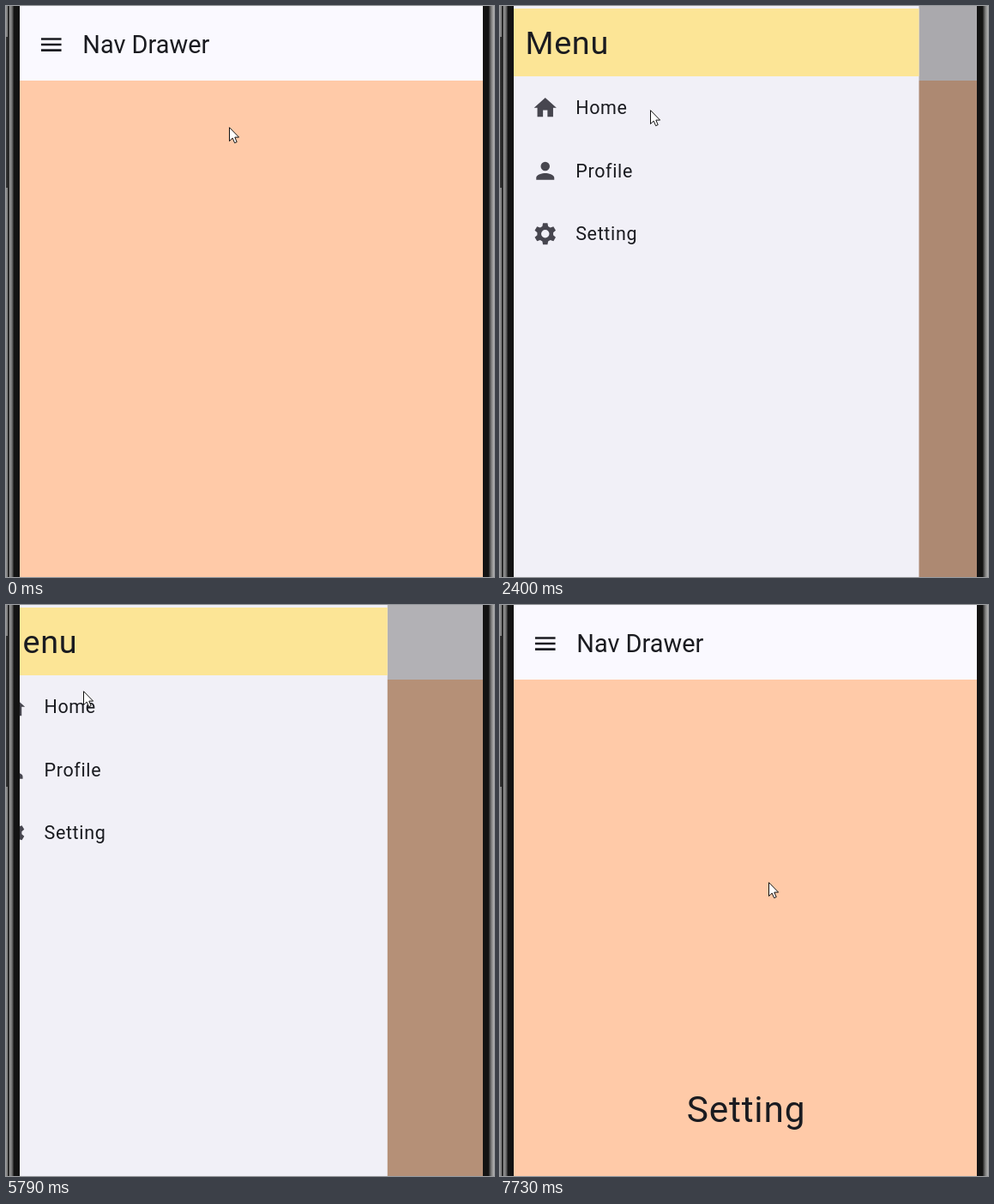
These frames come from a looping animation (569x666 px, 7990 ms). An HTML page:

```html
<!DOCTYPE html>
<html lang="en">
<head>
<meta charset="utf-8">
<title>Nav Drawer</title>
<style>
  html, body { margin: 0; width: 100%; height: 100%; overflow: hidden; background: #111; }
  svg { display: block; width: 100%; height: 100%; }
  text { font-family: Roboto, "Noto Sans", sans-serif; fill: #1a1b20; }
  .title { font-size: 28.9px; }
  .label { font-size: 42.4px; letter-spacing: .8px; text-anchor: middle; }
  .head { font-size: 37.8px; letter-spacing: .66px; }
  .item { font-size: 21.5px; letter-spacing: .65px; }
</style>
</head>
<body>
<svg viewBox="0 0 569 666">
  <defs>
    <clipPath id="screen"><rect x="16" width="540" height="666"/></clipPath>
    <clipPath id="row"><rect id="rowBox" x="16" width="472.5" height="73.6"/></clipPath>
    <radialGradient id="soft">
      <stop offset=".42" stop-color="#000" stop-opacity=".115"/>
      <stop offset=".72" stop-color="#000" stop-opacity=".05"/>
      <stop offset="1" stop-color="#000" stop-opacity="0"/>
    </radialGradient>
    <linearGradient id="metalL">
      <stop offset="0" stop-color="#777"/>
      <stop offset=".16" stop-color="#999"/>
      <stop offset=".24" stop-color="#111"/>
      <stop offset=".36" stop-color="#222"/>
      <stop offset=".46" stop-color="#8f8f8f"/>
      <stop offset=".75" stop-color="#777"/>
      <stop offset="1" stop-color="#222"/>
    </linearGradient>
    <linearGradient id="metalR">
      <stop offset="0" stop-color="#222"/>
      <stop offset=".45" stop-color="#777"/>
      <stop offset="1" stop-color="#b4b4b4"/>
    </linearGradient>
  </defs>

  <rect width="569" height="666" fill="#131313"/>
  <rect width="9" height="666" fill="url(#metalL)"/>
  <path d="M0 36h2v176h-2z" fill="#333"/>
  <rect x="563" width="6" height="666" fill="url(#metalR)"/>

  <g clip-path="url(#screen)">
    <rect x="16" width="540" height="87" fill="#faf9ff"/>
    <rect x="16" y="87" width="540" height="579" fill="#ffcaa8"/>
    <circle id="tap" cx="52.8" cy="45" r="26"/>
    <path transform="translate(37 29.25) scale(1.3125)" fill="#1a1b20" d="M3 6h18v2H3zM3 11h18v2H3zM3 16h18v2H3z"/>
    <text class="title" x="89.3" y="55.2">Nav Drawer</text>
    <text id="label" class="label" x="287" y="603.3"></text>
    <rect id="scrim" x="16" width="540" height="666"/>
    <g id="drawer">
      <rect x="16" width="472.5" height="666" fill="#f1f0f7"/>
      <rect x="16" y="3" width="472.5" height="79" fill="#fce596"/>
      <text class="head" x="29.5" y="55.6">Menu</text>
      <g id="items"></g>
      <g clip-path="url(#row)"><circle id="ripple" fill="url(#soft)"/></g>
    </g>
    <path id="cursor" d="M.5 .7V16.6L4.2 13.1L6.6 18.7L9.2 17.6L6.8 12.1H11.6Z" fill="#fff" stroke="#111" stroke-linejoin="round"/>
  </g>
</svg>
<script>
const LOOP = 7990, WIDTH = 472.5, SLIDE = 256, ROW = 73.5;
const $ = id => document.getElementById(id);
const clamp = v => Math.max(0, Math.min(1, v));

// time, x, y of the pointer tip
const path = [
  [0, 260, 141], [70, 260, 141], [100, 244, 143], [370, 244, 143],
  [1110, 61, 54], [1180, 61, 54], [1200, 60, 57], [1860, 60, 57],
  [2400, 175, 121], [4130, 175, 121], [4330, 120, 98], [4640, 280, 445],
  [4850, 228, 399], [5150, 330, 260], [5540, 56, 46], [5650, 56, 46],
  [5790, 90, 100], [6450, 207, 262], [6830, 207, 262], [7250, 388, 327],
  [7330, 388, 327], [7600, 330, 319], [7730, 313, 323], [LOOP, 313, 323]
];
const slides = [[1412, 1], [2944, 0], [5626, 1], [6567, 0]];
const buttonTaps = [1180, 5560];
const rowTaps = [
  { at: 2930, x: 175, y: 121, row: 0 },
  { at: 6500, x: 207, y: 266, row: 2 }
];

function gear() {
  let d = "";
  for (let k = 0; k < 6; k++) {
    for (const [r, a] of [[7.2, -21], [9.8, -12], [9.8, 12], [7.2, 21]]) {
      const w = (k * 60 + 30 + a) * Math.PI / 180;
      d += (d ? "L" : "M") + (12 + r * Math.cos(w)).toFixed(2) + " " + (12 + r * Math.sin(w)).toFixed(2);
    }
  }
  return d + "ZM15.6 12a3.6 3.6 0 1 0-7.2 0a3.6 3.6 0 1 0 7.2 0z";
}

const entries = [
  ["Home", "M10 20v-6h4v6h5v-8h3L12 3 2 12h3v8z"],
  ["Profile", "M12 12a4 4 0 1 0 0-8a4 4 0 0 0 0 8zm0 2c-2.67 0-8 1.34-8 4v2h16v-2c0-2.66-5.33-4-8-4z"],
  ["Setting", gear()]
];
$("items").innerHTML = entries.map(([name, d], i) => {
  const y = 118.75 + i * ROW;
  return `<path transform="translate(37 ${y - 15.75}) scale(1.3125)" fill="#47464f" fill-rule="evenodd" d="${d}"/>` +
    `<text class="item" x="88.2" y="${y + 7.6}">${name}</text>`;
}).join("");

// cubic-bezier(.4, 0, .2, 1)
function ease(x) {
  let lo = 0, hi = 1;
  for (let i = 0; i < 24; i++) {
    const u = (lo + hi) / 2, v = 1 - u;
    if (1.2 * v * v * u + .6 * v * u * u + u * u * u < x) lo = u; else hi = u;
  }
  return lo * lo * (3 - 2 * lo);
}

function slope(i, axis) {
  const a = path[i - 1], b = path[i], c = path[i + 1];
  if (!a || !c) return 0;
  const p = (b[axis] - a[axis]) / (b[0] - a[0]);
  const q = (c[axis] - b[axis]) / (c[0] - b[0]);
  return p * q > 0 ? 2 * p * q / (p + q) : 0;
}

// monotone cubic through the pointer path
function pointer(t, axis) {
  let i = 0;
  while (i < path.length - 2 && t >= path[i + 1][0]) i++;
  const a = path[i], b = path[i + 1], h = b[0] - a[0], s = (t - a[0]) / h;
  const s2 = s * s, s3 = s2 * s;
  return a[axis] * (2 * s3 - 3 * s2 + 1) + b[axis] * (3 * s2 - 2 * s3) +
    h * (slope(i, axis) * (s3 - 2 * s2 + s) + slope(i + 1, axis) * (s3 - s2));
}

function openness(t) {
  let open = 0;
  for (const [start, goal] of slides) {
    if (t >= start) open += (goal - open) * ease(clamp((t - start) / SLIDE));
  }
  return open;
}

function drawRipple(t) {
  const tap = rowTaps.find(r => t >= r.at && t < r.at + 450);
  const ripple = $("ripple");
  if (!tap) return ripple.setAttribute("opacity", 0);
  const age = t - tap.at;
  $("rowBox").setAttribute("y", 82 + tap.row * ROW);
  ripple.setAttribute("cx", tap.x);
  ripple.setAttribute("cy", tap.y);
  ripple.setAttribute("r", 20 + age * 1.2);
  ripple.setAttribute("opacity", clamp(age / 60) * clamp((450 - age) / 200));
}

function draw(t) {
  const open = openness(t);
  $("drawer").setAttribute("transform", `translate(${(open - 1) * WIDTH} 0)`);
  $("drawer").setAttribute("visibility", open > .001 ? "visible" : "hidden");
  $("scrim").setAttribute("opacity", .32 * open);
  $("label").textContent = t < 2944 ? "" : t < 6560 ? "Home" : "Setting";
  const tapped = buttonTaps.find(s => t >= s && t < s + 400);
  const age = tapped === undefined ? 0 : t - tapped;
  $("tap").setAttribute("opacity", .1 * clamp(age / 80) * clamp((400 - age) / 200));
  drawRipple(t);
  const x = Math.round(pointer(t, 1)), y = Math.round(pointer(t, 2));
  $("cursor").setAttribute("transform", `translate(${x} ${y})`);
}

const begin = performance.now();
function tick() {
  draw((performance.now() - begin) % LOOP);
  requestAnimationFrame(tick);
}
tick();
</script>
</body>
</html>
```
